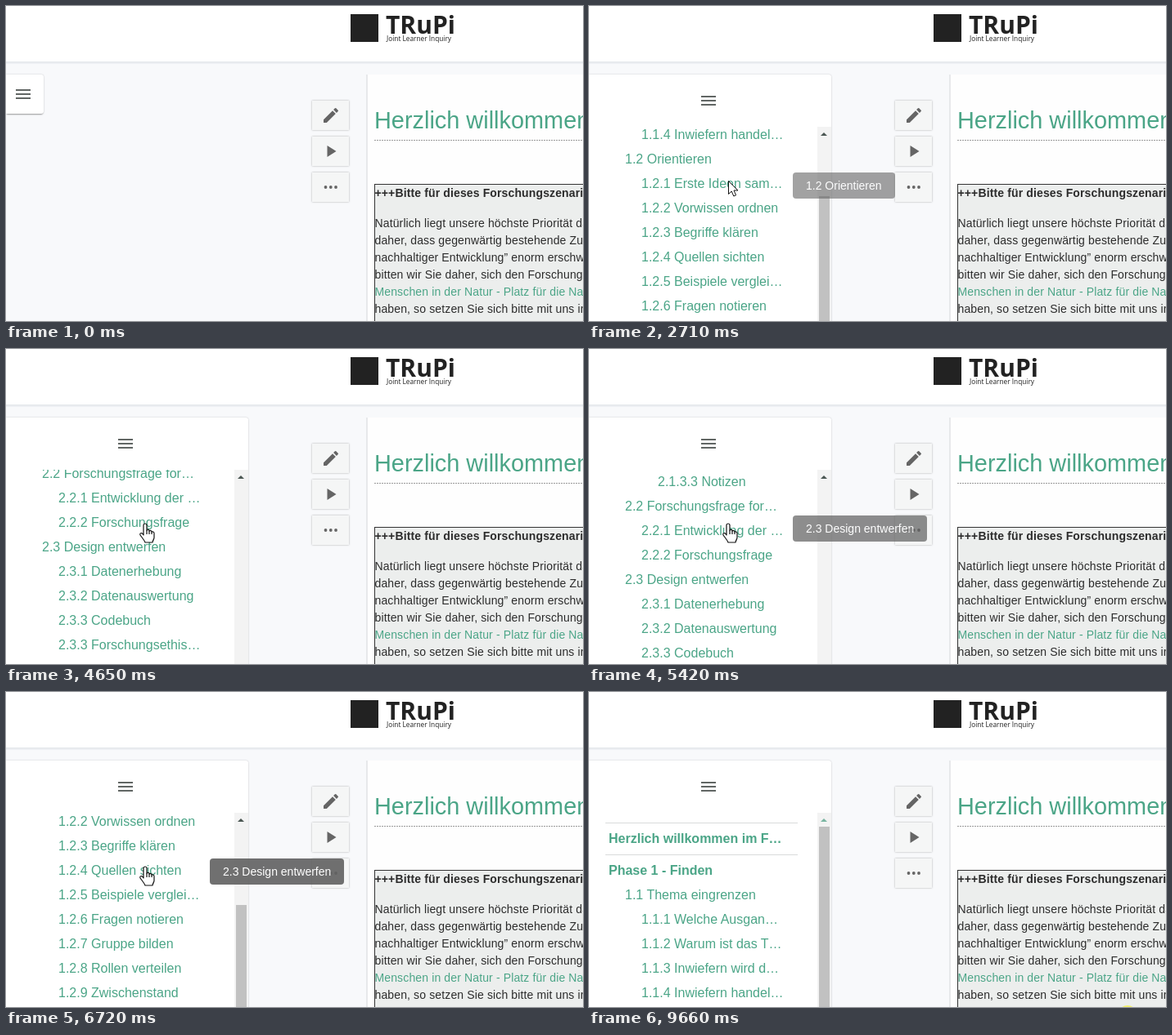
Recreate the animation shown at these times as an HTML page. Size 705 px wide and 386 px high, loop 9.73 s.

```html
<!DOCTYPE html>
<html lang="de">
<head>
<meta charset="utf-8">
<title>Menü im Forschungsszenario</title>
<style>
  html, body { margin: 0; width: 100%; height: 100%; overflow: hidden; background: #f8f9fb; }
  body { position: relative; font-family: "Liberation Sans", Arial, sans-serif; }
  svg.layer { position: absolute; left: 0; top: 0; }
  #copy { font-size: 14px; letter-spacing: .13px; }
  #panel { position: absolute; left: 0; top: 84px; overflow: hidden; background: #fff;
    border-radius: 0 3px 3px 0; box-shadow: 0 2px 2px -1px rgba(0,0,0,.35), 0 0 2px rgba(0,0,0,.22); }
  #burger { position: absolute; width: 18px; height: 12px; color: #616664; }
  #burger i { display: block; height: 2px; margin-bottom: 3px; background: currentColor; }
  #view { position: absolute; left: 20px; top: 64px; bottom: 0; overflow: hidden; }
  #list { margin: 0; padding: 8px 0 0; list-style: none; color: #4ba587; font-size: 16px; }
  #list li { height: 30px; line-height: 30px; padding-right: 16.4px; white-space: nowrap;
    overflow: hidden; text-overflow: ellipsis; }
  #list .phase { margin-top: 4px; padding-top: 4px; border-top: 1px solid #d9dbdb; font-weight: bold; }
  #bar { position: absolute; left: 279px; top: 64px; width: 17px; bottom: 0; background: #f3f3f3; }
  #thumb { position: absolute; left: 2px; width: 13px; height: 230px; background: #c1c1c1; }
  #up { position: absolute; left: 4px; top: 7px; border: solid transparent; border-width: 0 4.5px 4.5px; }
  #tip { position: absolute; left: 249px; top: 204px; padding: 0 16px; border-radius: 4px;
    background: rgba(97,97,97,.9); color: #fff; font-size: 14px; line-height: 32px; white-space: nowrap; }
</style>
</head>
<body>
<svg class="layer" width="705" height="386" viewBox="0 0 705 386">
  <defs>
    <filter id="soft" x="-20%" y="-20%" width="140%" height="140%">
      <feDropShadow dx="0" dy="0" stdDeviation="1.2" flood-opacity=".32"/>
    </filter>
  </defs>
  <rect width="705" height="386" fill="#f8f9fb"/>
  <rect y="67" width="705" height="4" fill="#eef0f4"/>
  <rect y="68" width="705" height="1.5" fill="#e5e8ec"/>
  <rect width="705" height="68" fill="#fff"/>

  <rect x="421" y="10" width="34" height="34" fill="#222"/>
  <g font-family="Open Sans, sans-serif" fill="#222">
    <text x="464" y="34" font-size="30" font-weight="700">TRuPi</text>
    <text x="465" y="43" font-size="8.3">Joint Learner Inquiry</text>
  </g>

  <rect x="441" y="84" width="264" height="302" fill="#fefefe"/>
  <path d="M441 84V386" stroke="#e0e2e4" stroke-width="1.5"/>
  <text x="450" y="150" font-size="28.9" fill="#4ba587">Herzlich willkommen</text>
  <path d="M450 164.5H705" stroke="#999" stroke-dasharray="2 1"/>
  <rect x="450.5" y="218.5" width="300" height="200" fill="#eceeed" stroke="#333"/>
  <g id="copy" fill="#2c2c2c"></g>

  <g fill="#f5f6f6" filter="url(#soft)">
    <rect x="374" y="116" width="45" height="36"/>
    <rect x="374" y="160" width="45" height="36"/>
    <rect x="374" y="204" width="45" height="36"/>
  </g>
  <g fill="#656565">
    <path d="M388 139.200V143h3.800l11-11-3.800-3.800zM405.700 129.100a1 1 0 0 0 0-1.400l-2.400-2.400a1 1 0 0 0-1.400 0l-1.800 1.800 3.800 3.800z"/>
    <path d="M392.500 171V185L403.500 178z"/>
    <circle cx="390.500" cy="222" r="1.900"/><circle cx="396.800" cy="222" r="1.900"/><circle cx="403" cy="222" r="1.900"/>
  </g>
</svg>

<div id="panel">
  <div id="burger"><i></i><i></i><i></i></div>
  <div id="view"><ul id="list"></ul></div>
  <div id="bar"><div id="up"></div><div id="thumb"></div></div>
</div>
<div id="tip"></div>

<svg class="layer" width="705" height="386" viewBox="0 0 705 386">
  <circle id="glow" cx="658" cy="396" r="12" fill="#f3f06c"/>
  <g id="cursor" fill="#fff" stroke="#111" stroke-linejoin="round">
    <path id="arrow" d="M.5 .5V16.500l3.700-3.500 2.600 6 2.800-1.200-2.600-5.800h5z"/>
    <g id="hand" stroke-width="1.2">
      <path d="M-2 2a2 2 0 0 1 4 0v6c1-1 3-1 3 1c1-1 3-.5 3 1c1-.5 3 0 3 2v5c0 2-1.500 3-2 6h-9c-1-3-4-6-6-9c-1-2 1-3 2.500-2l1.500 2z"/>
      <path d="M2 8v5M5 9v4M8 10v3" fill="none"/>
    </g>
  </g>
</svg>

<script>
const LOOP = 9730;
const $ = id => document.getElementById(id);

const copy = [
  [234, '+++Bitte für dieses Forschungszenario', 'bold'],
  [271, 'Natürlich liegt unsere höchste Priorität darin'],
  [292, 'daher, dass gegenwärtig bestehende Zusammen'],
  [313, 'nachhaltiger Entwicklung” enorm erschwert'],
  [334, 'bitten wir Sie daher, sich den Forschungsfragen'],
  [355, 'Menschen in der Natur - Platz für die Natur', 'link'],
  [376, 'haben, so setzen Sie sich bitte mit uns in']
];
for (const [y, words, kind] of copy) {
  const line = document.createElementNS('http://www.w3.org/2000/svg', 'text');
  line.setAttribute('x', 450.5);
  line.setAttribute('y', y);
  line.textContent = words;
  if (kind === 'bold') line.setAttribute('font-weight', 'bold');
  if (kind === 'link') { line.id = 'link'; line.setAttribute('fill', '#4ba587'); }
  $('copy').append(line);
}

const entries = `Herzlich willkommen im Forschungsszenario
Phase 1 - Finden
1.1 Thema eingrenzen
1.1.1 Welche Ausgangslage besteht
1.1.2 Warum ist das Thema relevant
1.1.3 Inwiefern wird das Thema behandelt
1.1.4 Inwiefern handelt es sich um Forschung
1.2 Orientieren
1.2.1 Erste Ideen sammeln
1.2.2 Vorwissen ordnen
1.2.3 Begriffe klären
1.2.4 Quellen sichten
1.2.5 Beispiele vergleichen
1.2.6 Fragen notieren
1.2.7 Gruppe bilden
1.2.8 Rollen verteilen
1.2.9 Zwischenstand
1.3 Ziele festlegen
1.3.1 Zielrichtung für das Projekt
1.3.2 Nachhaltigkeitskriterien
1.3.3 Wie geht es mit dem Thema weiter
1.4 Motivationsvideo
1.4.1 Motivationsvideo erstellen
Phase 2 - Planen
2.1 Gezielt recherchieren
2.1.1 Vorgehen, Kriterien und Suche
2.1.2 Ergänzende Literatur
2.1.3 Ergebnis der gezielten Recherche
2.1.3.1 Literaturverzeichnis
2.1.3.2 Archiv
2.1.3.3 Notizen
2.2 Forschungsfrage formulieren
2.2.1 Entwicklung der Forschungsfrage
2.2.2 Forschungsfrage
2.3 Design entwerfen
2.3.1 Datenerhebung
2.3.2 Datenauswertung
2.3.3 Codebuch
2.3.3 Forschungsethische Fragen
2.4 Planung prüfen
2.4.1 Rückmeldung
2.4.2 Zeitplan`.split('\n');
for (const entry of entries) {
  const item = document.createElement('li');
  const number = entry.match(/^[\d.]+/);
  const level = number ? number[0].split('.').length - 1 : 0;
  item.textContent = entry;
  item.style.paddingLeft = 4 + 20 * level + 'px';
  if (!level) item.className = 'phase';
  $('list').append(item);
}

// Keys are [time, ...values].
const scrollKeys = [[2500, 0], [2900, 400], [3300, 400], [3480, 564], [3960, 800], [4470, 800],
  [4650, 975], [4780, 999], [5290, 999], [5900, 699], [6230, 699], [6720, 300], [6910, 300], [7300, 0]];
const cursorKeys = [[300, 708, 362], [1310, 36, 116], [1380, 36, 115], [1900, 36, 115], [2300, 170, 214],
  [7690, 170, 214], [7700, 171, 207], [8640, 569, 348], [8710, 580, 350], [9110, 656, 392]];
const handTimes = [[1290, 1950], [3560, 7690], [8660, 8860]];
const tips = [
  ['1.2 Orientieren', 2620, 2900],
  ['2.2.2 Forschungsfrage', 4680, 5080],
  ['2.3 Design entwerfen', 5310, 7920]
];

const clamp = v => Math.max(0, Math.min(1, v));
const smooth = p => p * p * (3 - 2 * p);
const within = (t, spans) => spans.some(([from, to]) => t >= from && t < to);
const show = (el, on) => { el.style.visibility = on ? 'visible' : 'hidden'; };

function track(keys, t, ease = p => p) {
  const next = keys.findIndex(key => key[0] > t);
  if (next === 0) return keys[0].slice(1);
  if (next < 0) return keys[keys.length - 1].slice(1);
  const a = keys[next - 1], b = keys[next];
  const p = ease((t - a[0]) / (b[0] - a[0]));
  return a.slice(1).map((v, i) => v + (b[i + 1] - v) * p);
}

function drawPanel(t) {
  const open = 1 - (1 - clamp((t - 1490) / 515)) ** 3;
  const settled = open === 1;
  const width = 46 + 250 * open;
  const [scroll] = track(scrollKeys, t);

  $('panel').style.width = width + 'px';
  $('panel').style.height = 48 + 700 * open + 'px';
  $('burger').style.left = width / 2 - 11 + 'px';
  $('burger').style.top = 18 + 8 * open + 'px';
  $('burger').style.color = within(t, [[1300, 1950]]) ? '#55897a' : '';

  show($('view'), open > 0);
  $('view').style.top = (settled ? 64 : 63.6) + 'px';
  $('view').style.width = Math.max(0, settled ? 235 : width - 44) + 'px';
  $('list').style.transform = `translateY(${-Math.round(scroll)}px)`;

  show($('bar'), settled);
  $('thumb').style.top = 17 + 0.32 * scroll + 'px';
  $('up').style.borderBottomColor = scroll > 0 ? '#4a5652' : '#79b5a1';
}

function drawTip(t) {
  const tip = tips.find(([, from, to]) => t >= from && t < to);
  show($('tip'), tip);
  if (!tip) return;
  const [label, from, to] = tip;
  $('tip').textContent = label;
  $('tip').style.opacity = Math.min(clamp((t - from) / 140), clamp((to - t) / 160));
}

function drawCursor(t) {
  const [x, y] = track(cursorKeys, t, smooth);
  const isHand = within(t, handTimes);
  $('cursor').setAttribute('transform', `translate(${x} ${y})`);
  show($('arrow'), !isHand);
  show($('hand'), isHand);
  $('link').style.textDecoration = within(t, [[8700, 8860]]) ? 'underline' : 'none';
  show($('glow'), t >= 9660);
}

function frame(now) {
  const t = now % LOOP;
  drawPanel(t);
  drawTip(t);
  drawCursor(t);
  requestAnimationFrame(frame);
}
frame(0);
</script>
</body>
</html>
```
